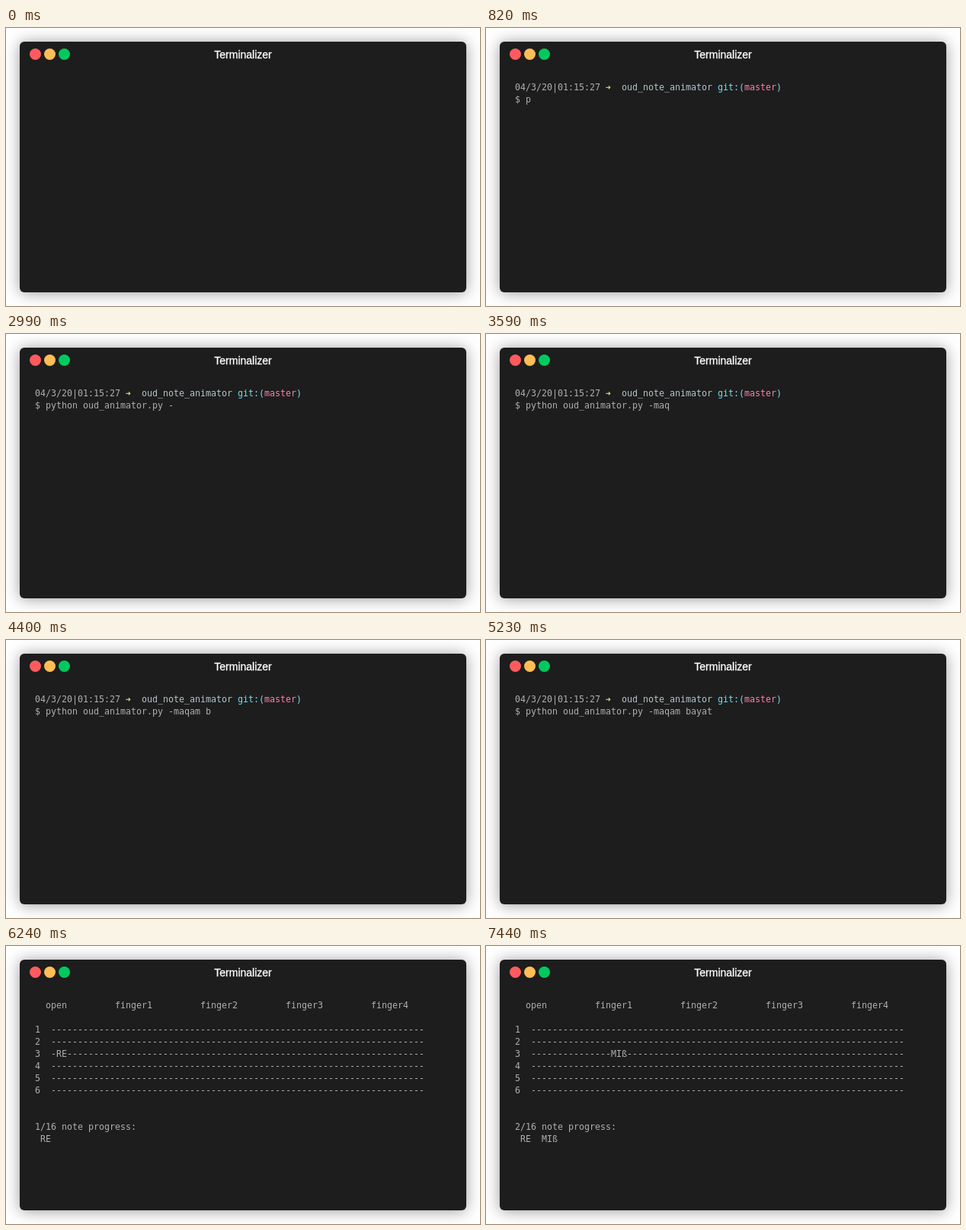
An HTML page for the animation above (8000 ms loop, 622 by 366 pixels).

```html
<!DOCTYPE html>
<html lang="en">
<head>
<meta charset="utf-8">
<title>Terminal</title>
<style>
  html, body { margin: 0; width: 100%; height: 100%; overflow: hidden; background: #fff; }
  .window {
    position: absolute; left: 18px; top: 18px; width: 586px; height: 330px;
    border-radius: 6px; background: #1d1d1d; box-shadow: 0 1px 20px rgba(0, 0, 0, .4);
  }
  .button { position: absolute; top: 9px; width: 15px; height: 15px; border-radius: 50%; }
  .title {
    position: absolute; top: 9px; width: 100%; text-align: center; color: #fff;
    font: 14px/16px "Liberation Sans", Arial, sans-serif; -webkit-text-stroke: .3px #fff;
  }
  pre {
    position: absolute; left: 20px; top: 52px; margin: 0; color: #afafaf;
    font: 11.63px/16px "DejaVu Sans Mono", monospace; font-variant-ligatures: none;
  }
  .arrow { display: inline-block; width: 7px; height: 16px; vertical-align: top; color: #c8ed71; }
  .folder { color: #b1c6ca; }
  .git { color: #75dff2; }
  .branch { color: #ff7fac; }
</style>
</head>
<body>
<div class="window">
  <div class="button" style="left:13px;background:#ff5b5f"></div>
  <div class="button" style="left:32px;background:#ffbf56"></div>
  <div class="button" style="left:51px;background:#02c95f"></div>
  <div class="title">Terminalizer</div>
  <pre id="screen"></pre>
</div>
<script>
const LOOP = 8000;
const screen = document.getElementById('screen');

const PROMPT = '04/3/20|01:15:27 <span class="arrow">➜</span>  ' +
  '<span class="folder">oud_note_animator</span> ' +
  '<span class="git">git:(<span class="branch">master</span>)</span>\n$ ';

// Each entry: time in ms, text added to the command line.
const KEYS = [
  [820, 'p'], [900, 'y'], [975, 't'], [1050, 'h'], [1125, 'o'], [1200, 'n'],
  [2170, ' o'], [2260, 'u'], [2400, 'd_animator.py'],
  [2990, ' -'], [3290, 'm'], [3420, 'a'], [3590, 'q'], [3720, 'a'], [3860, 'm'],
  [4400, ' b'], [4510, 'a'], [4700, 'y'], [4830, 'a'], [5230, 't']
];

// Column counts from the start of the dashed string.
const NOTES = [
  { name: 'RE', string: 3, column: 1 },
  { name: 'MIß', string: 3, column: 15 }
];

function fretboard(count) {
  const note = NOTES[count - 1];
  const header = '  open' + [1, 2, 3, 4].map(n => ' '.repeat(9) + 'finger' + n).join('');
  const strings = [1, 2, 3, 4, 5, 6].map(n => {
    const line = n === note.string
      ? ('-'.repeat(note.column) + note.name).padEnd(70, '-')
      : '-'.repeat(70);
    return n + '  ' + line;
  });
  const played = NOTES.slice(0, count).map(n => ' ' + n.name).join(' ');
  return [header, '', ...strings, '', '', count + '/16 note progress:', played].join('\n');
}

function contentAt(time) {
  if (time < 50) return '';
  if (time < 6140) {
    return PROMPT + KEYS.filter(([at]) => time >= at).map(([, text]) => text).join('');
  }
  if (time < 6240) return '';
  if (time < 7340) return fretboard(1);
  if (time < 7440) return '';
  return fretboard(2);
}

const start = performance.now();
let shown = '';

function draw() {
  const content = contentAt((performance.now() - start) % LOOP);
  if (content !== shown) screen.innerHTML = shown = content;
  requestAnimationFrame(draw);
}
draw();
</script>
</body>
</html>
```
